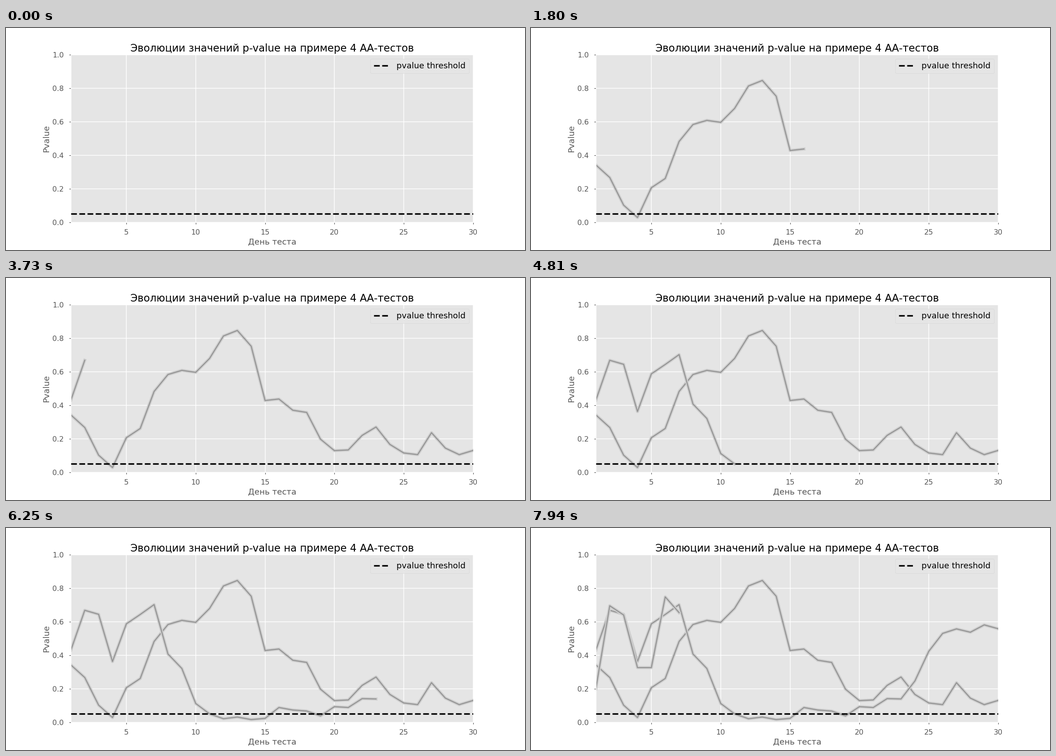
These frames come from a looping animation (1143x490 px, 8 s). A matplotlib script:

```python
import matplotlib.pyplot as plt
from matplotlib.animation import FuncAnimation
from matplotlib.patheffects import Normal, Stroke

WIDTH, HEIGHT = 1143, 490
DPI = 72            # one point equals one pixel
SCALE = 1.134       # enlarges the nominal font and line sizes
DAYS = 30
INTERVAL = 40
FRAMES_PER_DAY = 3
LOOP = 8000

# p-value of each test by day; the last test is only partly seen
TESTS = [
    [.342, .267, .102, .028, .206, .261, .482, .583, .608, .596,
     .679, .813, .846, .752, .428, .437, .370, .357, .197, .129,
     .133, .220, .270, .166, .115, .105, .236, .144, .105, .130],
    [.430, .668, .644, .362, .587, .643, .702, .407, .321, .112,
     .050, .021, .031, .016, .023, .088, .073, .067, .038, .093,
     .088, .141, .139, .246, .423, .530, .557, .537, .581, .558],
    [.200, .695, .640, .326, .326, .748, .654],
]


def scaled(size):
    return size * SCALE


plt.style.use("ggplot")
plt.rcParams["font.family"] = "DejaVu Sans"

fig = plt.figure(figsize=(WIDTH / DPI, HEIGHT / DPI), dpi=DPI, facecolor="white")
ax = fig.add_axes([.125, .125, .775, .755])
ax.set(xlim=(1, DAYS), ylim=(0, 1))
ax.grid(color="white", linewidth=1.5)
ax.tick_params(labelsize=scaled(14), length=scaled(3.5), width=1.2, pad=scaled(10))
ax.set_title("Эволюции значений p-value на примере 4 АА-тестов",
             fontsize=scaled(20), pad=scaled(6))
ax.set_xlabel("День теста", fontsize=scaled(16), labelpad=scaled(4))
ax.set_ylabel("Pvalue", fontsize=scaled(16), labelpad=scaled(4))

ax.axhline(.05, color="black", linestyle="--", linewidth=scaled(3),
           zorder=3, label="pvalue threshold")
ax.legend(loc="upper right", fontsize=scaled(16))

halo = [Stroke(linewidth=scaled(6), foreground="#cecece"), Normal()]
lines = [ax.plot([], [], color="#939393", linewidth=scaled(2),
                 path_effects=halo)[0] for _ in TESTS]


def update(frame):
    current, day = divmod(frame // FRAMES_PER_DAY, DAYS)
    for i, (line, values) in enumerate(zip(lines, TESTS)):
        if i < current:
            shown = values
        elif i == current and day > 0:
            shown = values[:day + 1]
        else:
            shown = []
        line.set_data(range(1, len(shown) + 1), shown)
    return lines


anim = FuncAnimation(fig, update, frames=LOOP // INTERVAL, interval=INTERVAL,
                     init_func=lambda: update(0), repeat=True, repeat_delay=0)
plt.show()
```
